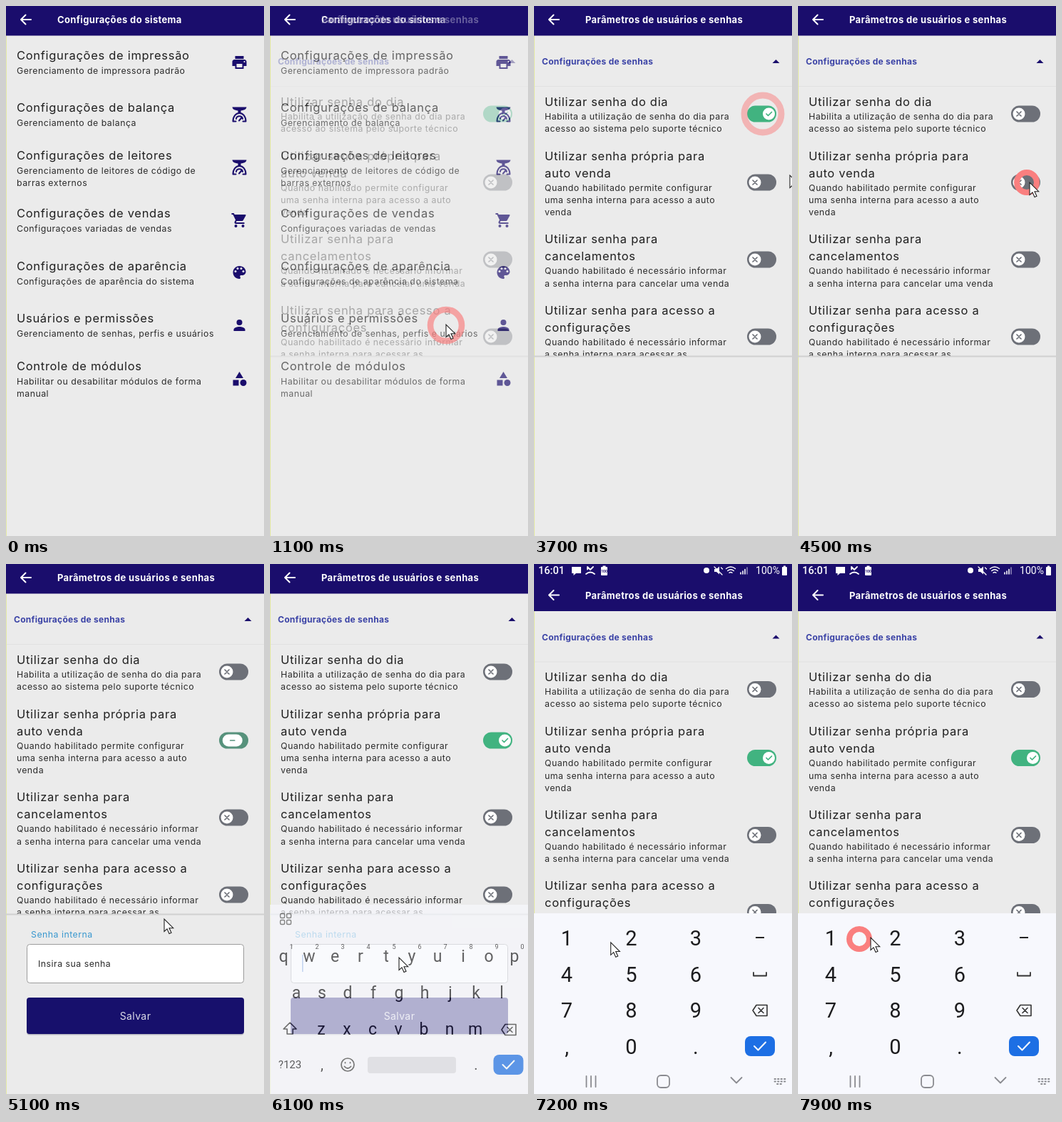
An HTML page for the animation above (8 s loop, 362x742 px).

```html
<!DOCTYPE html>
<html lang="pt-BR">
<head>
<meta charset="utf-8">
<title>Configurações</title>
<style>
html, body { margin: 0; width: 100%; height: 100%; overflow: hidden; background: #ebebeb; }
svg { display: block; width: 362px; height: 742px; }
text { font-family: Inter, "Open Sans", sans-serif; }
.bar { font-size: 13px; font-weight: 700; letter-spacing: .35px; fill: #fff; }
.title { font-size: 16.5px; letter-spacing: .7px; fill: #202020; }
.sub { font-size: 12.3px; letter-spacing: .5px; fill: #2c2c2c; }
.section { font-size: 12px; font-weight: 700; letter-spacing: .28px; fill: #3b43a6; }
.key, .status { font-family: Roboto, "Noto Sans", sans-serif; text-anchor: middle; }
.key { fill: #1c1c1e; }
.line { fill: none; stroke-linecap: round; stroke-linejoin: round; }
</style>
</head>
<body>
<svg id="stage" viewBox="0 0 362 742"></svg>
<script>
const NAVY = '#1a0d6c', PAPER = '#ebebeb', LOOP = 8000, STEP = 100;
const stage = document.getElementById('stage');

const text = (x, y, cls, str, extra = '') => `<text x="${x}" y="${y}" class="${cls}" ${extra}>${str}</text>`;
const rect = (x, y, w, h, fill, r = 0, extra = '') =>
  `<rect x="${x}" y="${y}" width="${w}" height="${h}" rx="${r}" fill="${fill}" ${extra}/>`;
const line = (d, color, width = 2, extra = '') =>
  `<path class="line" d="${d}" stroke="${color}" stroke-width="${width}" ${extra}/>`;
const group = (id, body, extra = '') => `<g id="${id}" ${extra}>${body}</g>`;

const header = title =>
  rect(0, 0, 362, 742, PAPER) + rect(0, 41, 1, 701, '#e3e8a4') + rect(0, 0, 362, 41.5, NAVY) +
  line('M35 19H21M27.5 12.5L21 19l6.5 6.5', '#fff', 2) + text(72, 24, 'bar', title);

const icons = {
  printer: '<path d="M19 8H5c-1.66 0-3 1.34-3 3v6h4v4h12v-4h4v-6c0-1.66-1.34-3-3-3zm-3 11H8v-5h8v5zm3-7c-.55 0-1-.45-1-1s.45-1 1-1 1 .45 1 1-.45 1-1 1zm-1-9H6v4h12V3z"/>',
  scale: '<path d="M2 1.5h20c-.5 3.5-4 4.5-8 5V10h-4V6.500c-4-.5-7.500-1.500-8-5z"/>' +
    line('M3 21.500c0-7 4-11.500 9-11.500s9 4.500 9 11.500h-4M3 21.500h4M7.500 18c.5-5 8.500-5 9 0', NAVY, 2) +
    line('M11.500 20.500l3.500-4', NAVY, 2),
  cart: '<path d="M7 18a2 2 0 1 0 0 4 2 2 0 0 0 0-4zM1 2v2h2l3.600 7.590-1.350 2.450C4.500 15.400 5.500 17 7 17h12v-2H7.420c-.2 0-.3-.2-.22-.37l.9-1.630h7.450c.75 0 1.410-.41 1.750-1.030l3.580-6.490A1 1 0 0 0 20 4H5.210l-.94-2H1zm16 16a2 2 0 1 0 0 4 2 2 0 0 0 0-4z"/>',
  palette: '<path d="M12 3c-5 0-9 4-9 9s4 9 9 9c.83 0 1.500-.67 1.500-1.500 0-.8-.77-1.100-.77-2 0-.83.67-1.500 1.500-1.500H16c2.760 0 5-2.240 5-5 0-4.420-4-8-9-8z"/>' +
    [[6.5, 10.5], [9.5, 6.5], [14.5, 6.5], [17.5, 10.5]].map(([x, y]) => `<circle cx="${x}" cy="${y}" r="1.5" fill="${PAPER}"/>`).join(''),
  person: '<circle cx="12" cy="8" r="4"/><path d="M12 14c-2.670 0-8 1.340-8 4v2h16v-2c0-2.660-5.330-4-8-4z"/>',
  shapes: '<path d="M12 2l-5.500 9h11z"/><circle cx="17.5" cy="17.5" r="4.5"/><path d="M3 13.500h8v8H3z"/>'
};

const menu = [
  [70, 'Configurações de impressão', 79, 'printer', 'Gerenciamento de impressora padrão'],
  [143, 'Configurações de balança', 152, 'scale', 'Gerenciamento de balança'],
  [210, 'Configurações de leitores', 226, 'scale', 'Gerenciamento de leitores de código de', 'barras externos'],
  [291, 'Configurações de vendas', 300, 'cart', 'Configuraçoes variadas de vendas'],
  [365, 'Configurações de aparência', 373, 'palette', 'Configurações de aparência do sistema'],
  [438, 'Usuários e permissões', 447, 'person', 'Gerenciamento de senhas, perfis e usuários'],
  [505, 'Controle de módulos', 522, 'shapes', 'Habilitar ou desabilitar módulos de forma', 'manual']
];
const menuPage = header('Configurações do sistema') + menu.map(([y, title, iconY, icon, ...subs]) =>
  text(15, y + 5, 'title', title) +
  subs.map((s, i) => text(15, y + 24.5 + i * 17.3, 'sub', s)).join('') +
  `<g transform="translate(315.500 ${iconY - 12})" fill="${NAVY}">${icons[icon]}</g>`).join('');

const options = [
  [134, 151, ['Utilizar senha do dia'], ['Habilita a utilização de senha do dia para', 'acesso ao sistema pelo suporte técnico']],
  [210, 247, ['Utilizar senha própria para', 'auto venda'], ['Quando habilitado permite configurar', 'uma senha interna para acesso a auto', 'venda']],
  [326.5, 355, ['Utilizar senha para', 'cancelamentos'], ['Quando habilitado é necessário informar', 'a senha interna para cancelar uma venda']],
  [426, 463, ['Utilizar senha para acesso a', 'configurações'], ['Quando habilitado é necessário informar', 'a senha interna para acessar as']]
];
const optionRows = options.map(([y, toggleY, titles, subs], n) => {
  const subTop = y + 24.5 + (titles.length - 1) * 24.3;
  return titles.map((s, i) => text(15, y + 5.5 + i * 24.3, 'title', s)).join('') +
    subs.map((s, i) => text(15, subTop + i * 17.3, 'sub', s)).join('') +
    group('toggle' + n, '', `transform="translate(299 ${toggleY})"`);
}).join('');

const passwordForm =
  text(35, 523, 'sub', 'Senha interna', 'style="fill:#3a98cf"') +
  rect(29.5, 532.5, 304, 54, '#fff', 4, 'stroke="#9c9c9c"') +
  text(45, 564, 'sub', 'Insira sua senha', 'id="hint"') +
  rect(45, 547, 1.5, 24, '#4a7fd0', 0, 'id="caret"') +
  rect(29, 608.5, 305, 51, '#b9b9c2', 4) + rect(29, 607, 305, 51, '#17106c', 4) +
  text(181.5, 638, 'sub', 'Salvar', 'text-anchor="middle" style="font-size:14px;letter-spacing:.4px;fill:#dcdce8"');

const paramsPage = header('Parâmetros de usuários e senhas') +
  text(11, 82, 'section', 'Configurações de senhas') +
  `<path d="M334.500 80h10l-5-5z" fill="${NAVY}"/>` + rect(1, 112, 361, 1, '#e1e1e1') +
  `<g clip-path="url(#panel)">${optionRows}</g>` +
  rect(0, 489.5, 362, 2, '#d0d0d0') + group('form', passwordForm);

// Keyboards
const key = (x, y, s, size) => text(x, y + size * .36, 'key', s, `font-size="${size}"`);
const backspace = (x, y) =>
  line(`M${x - 10} ${y}l5-7.500h15v15h-15zM${x - 2} ${y - 3.5}l7 7m0-7l-7 7`, '#333', 1.6);
const enter = (x, y) => rect(x - 21, y - 14, 42, 28, '#1d6fe4', 8) + line(`M${x - 8} ${y}l5.500 5.500L${x + 8} ${y - 5.5}`, '#fff', 2);
const letterRow = (letters, x, y) => [...letters].map((c, i) => key(x + i * 36, y, c, 23)).join('');

const letterPad = rect(0, 477, 362, 265, '#f7f8fd') +
  [0, 1, 2, 3].map(i => rect(14.5 + i % 2 * 9, 489.5 + (i >> 1) * 9, 6, 6, 'none', 1.5, 'stroke="#555" stroke-width="1.4"')).join('') +
  letterRow('qwertyuiop', 19, 549) + letterRow('asdfghjkl', 37, 600) + letterRow('zxcvbnm', 72, 651) +
  [...'1234567890'].map((c, i) => key(30 + i * 36, 536, c, 9)).join('') +
  line('M28 642l-9 9h5v7h8v-7h5z', '#333', 1.6) + backspace(335, 652) +
  key(28, 701, '?123', 15) + key(73, 701, ',', 20) + key(289, 701, '.', 20) +
  '<circle cx="109" cy="701" r="9" fill="none" stroke="#444" stroke-width="1.7"/>' +
  line('M105.500 698v.5m7-.5v.5M104.500 703.500q4.500 5 9 0', '#444', 1.8) +
  rect(137, 690, 124, 23, '#dcdce1', 4) + enter(334.5, 701);

const numberPad = rect(0, 489, 362, 253, '#f7f8fd') + rect(1, 498, 90, 50, '#dfe1e8', 6, 'id="pressed"') +
  ['123', '456', '789', ',0.'].map((row, r) =>
    [...row].map((c, i) => key(46 + i * 90.4, 523.5 + r * 50.7, c, 29)).join('')).join('') +
  rect(311, 522, 12, 2, '#222') + line('M308 572v4.500h18V572', '#333', 1.8) +
  backspace(317, 625) + enter(317, 675);

const navBar =
  line('M73.500 717v15M80 717v15M86.500 717v15', '#8a8b90', 1.8) +
  rect(173, 716, 17, 17, 'none', 5, 'stroke="#8a8b90" stroke-width="1.8"') +
  line('M276.500 719l7.500 7.500 7.500-7.500', '#8a8b90', 1.8) +
  line('M337.500 721h15M337.500 724.500h15M341 728h8', '#8a8b90', 1.8, 'stroke-dasharray="1.5 3"');

const statusBar = rect(0, 0, 362, 26, NAVY) +
  text(24.5, 14.3, 'status', '16:01', 'fill="#fff" font-size="14.5" font-weight="500"') +
  '<path d="M53 4h13v9H59l-3.500 3v-3H53z" fill="#fff"/>' +
  line('M75 4l4 4 4-4M75 4v3.500M73 14q6-5 12 0', '#fff', 1.8) +
  rect(94, 4, 9, 12, '#fff', 1) + rect(96.5, 2.5, 4, 2, '#fff') +
  text(98.5, 12, 'status', '100', `fill="${NAVY}" font-size="5" font-weight="700"`) +
  '<circle cx="242" cy="9" r="4" fill="#fff"/>' +
  '<path d="M253 7h3l4-3.500v11L256 11h-3z" fill="#fff"/>' + line('M253 4l11 11M262.500 5l2 2', '#fff', 1.3) +
  line('M269.500 6.500q6.500-5 13 0M271.700 9.500q4.300-3.500 8.600 0M274 12.300q2-1.700 4 0', '#fff', 1.4) +
  line('M290 14v-2M293 14v-4M296 14V7.500', '#fff', 1.6) + line('M299 14V5', '#8d86b8', 1.6) +
  text(328, 14.3, 'status', '100%', 'fill="#fff" font-size="14"') +
  rect(348, 4, 7, 12, '#fff', 1) + rect(350, 2.5, 3, 2, '#fff');

stage.innerHTML =
  '<clipPath id="panel"><path d="M0 42h362v448H0z"/></clipPath>' +
  group('app', group('menu', menuPage) + group('params', paramsPage)) +
  group('letters', letterPad) + group('numbers', numberPad) + group('system', statusBar + navBar) +
  '<circle id="ring" fill="none" stroke="#fa7f7f"/>' +
  '<path id="cursor" d="M0 0v17.500l4-3.700 3 6.700 3-1.300-3-6.500h5.700z" fill="#fff" stroke="#222" stroke-width="1.1"/>';

const el = id => document.getElementById(id);
const set = (id, attrs) => { for (const name in attrs) el(id).setAttribute(name, attrs[name]); };
const show = (id, on) => set(id, { visibility: on ? 'visible' : 'hidden' });
const ramp = (t, from, to) => Math.min(1, Math.max(0, (t - from) / (to - from)));
const mix = (a, b, p) => a + (b - a) * p;

// Cursor path: time, x, y
const path = [
  [300, 311, 473], [400, 269, 458], [500, 269, 458], [600, 247, 446], [1500, 247, 446], [1600, 250, 437],
  [2100, 319, 265], [2300, 327, 190], [2500, 327, 190], [2800, 320, 152], [3300, 320, 152], [3700, 359, 237],
  [3800, 372, 245], [4200, 372, 245], [4400, 325, 247], [4700, 325, 247], [5100, 222, 497], [5300, 181, 551],
  [6100, 181, 551], [6400, 190, 539], [6800, 190, 539], [7500, 46, 523], [7700, 66, 524], [7800, 86, 525], [7900, 102, 523]
];
const clicks = [[800, 247, 447], [3300, 321, 151], [4400, 321, 247], [5300, 181, 553], [7800, 86, 525]];

function cursorAt(t) {
  const i = path.findIndex(p => p[0] >= t);
  if (i < 1) return path[i < 0 ? path.length - 1 : 0].slice(1);
  const [a, b] = [path[i - 1], path[i]], p = ramp(t, a[0], b[0]);
  return [mix(a[1], b[1], p), mix(a[2], b[2], p)];
}

function toggle(p) {
  const off = [109, 112, 120], on = [65, 179, 128];
  const color = `rgb(${off.map((c, i) => Math.round(mix(c, on[i], p)))})`;
  const x = mix(11, 30.5, p) - Math.sin(p * Math.PI) * 2, w = 17 + 11 * Math.sin(p * Math.PI);
  const mark = p < .35 ? 'l6 6m0-6l-6 6' : p > .65 ? 'm-.5 3l2.500 2.500 5-5' : 'm0 3h6';
  return rect(0, -11.5, 41, 23, color, 11.5) + rect(x - w / 2, -8.5, w, 17, '#fff', 8.5) +
    line(`M${x - 3} -3${mark}`, color, 1.7);
}

function render(t) {
  const typing = t >= 6300;
  set('params', { opacity: ramp(t, 1000, 1300) });
  set('app', { transform: `translate(0 ${typing ? 24.5 : 0})` });
  [1 - ramp(t, 3750, 4050), ramp(t, 4950, 5250), 0, 0].forEach((p, i) => { el('toggle' + i).innerHTML = toggle(p); });

  show('form', t >= 5000);
  show('hint', t >= 5000 && t < 5900);
  show('caret', t >= 5900);
  set('letters', { opacity: typing ? 0 : [0, .3, .69, .95][Math.round(ramp(t, 5900, 6200) * 3)] });
  show('numbers', typing);
  show('system', typing);
  show('pressed', t >= 7600 && t < 7800);
  set('numbers', { transform: `translate(0 ${t < 6500 ? 24.3 : 0})` });

  const click = clicks.find(([start]) => t >= start && t < start + 700);
  show('ring', click);
  if (click) {
    const age = t - click[0];
    set('ring', {
      cx: click[1], cy: click[2], r: 10 + age * .04, 'stroke-width': 7.7 + age * .003,
      opacity: Math.min(1, 1.17 - age / 600)
    });
  }
  show('cursor', t >= 300);
  set('cursor', { transform: `translate(${cursorAt(t)})` });
}

let shown = -1;
const begin = performance.now();
function tick() {
  const t = Math.floor((performance.now() - begin) % LOOP / STEP) * STEP;
  if (t !== shown) render(shown = t);
  requestAnimationFrame(tick);
}
tick();
</script>
</body>
</html>
```
